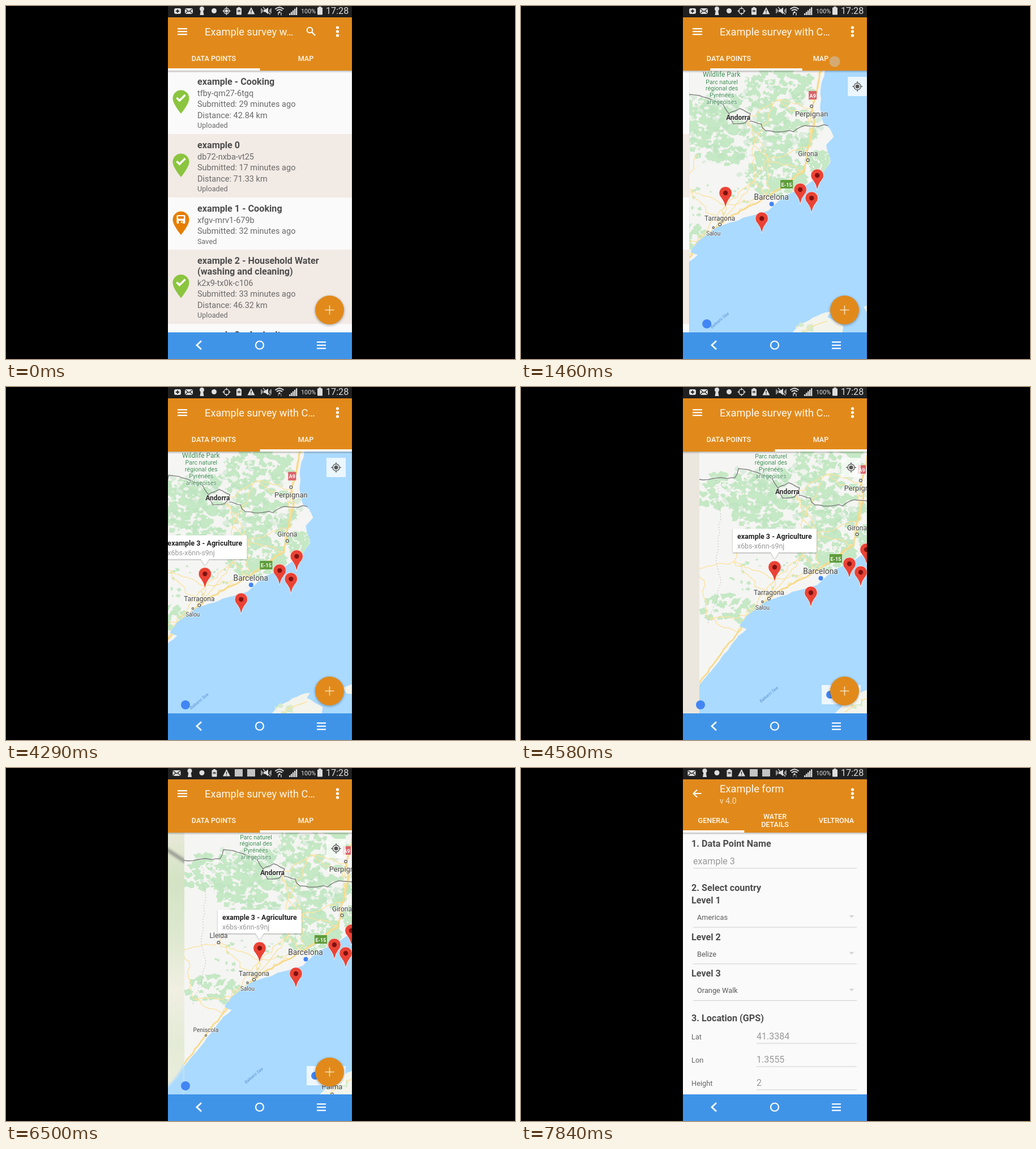
An HTML page for the animation above (8 s loop, 899 px wide and 623 px high).

```html
<!DOCTYPE html>
<html lang="en">
<head>
<meta charset="utf-8">
<title>Survey app</title>
<style>
html, body { margin: 0; width: 100%; height: 100%; overflow: hidden; background: #000; }
svg { display: block; width: 100vw; height: 100vh; font-family: Roboto, sans-serif; }
.halo { paint-order: stroke; stroke: #fff; stroke-width: 1.6px; stroke-opacity: .7; text-anchor: middle; }
</style>
</head>
<body>
<svg id="stage" viewBox="0 0 899 623"></svg>
<script>
const ORANGE = '#e18a1b', INK = '#dedede', GREY = '#6a6a6a', DARK = '#4d4d4d', CREAM = '#fff8ee';
const LOOP = 8000, BEAT = 147, LEFT = 286, WIDTH = 325;

// ---- drawing helpers ----
const text = (x, y, s, size, fill, more = '') =>
  `<text x="${x}" y="${y}" font-size="${size}" fill="${fill}" ${more}>${s}</text>`;
const mid = 'text-anchor="middle"', bold = 'font-weight="700"', medium = 'font-weight="500"';
const rect = (x, y, w, h, fill, more = '') =>
  `<rect x="${x}" y="${y}" width="${w}" height="${h}" fill="${fill}" ${more}/>`;
const dot = (x, y, r, fill, more = '') => `<circle cx="${x}" cy="${y}" r="${r}" fill="${fill}" ${more}/>`;
const ring = (x, y, r, color, width) => dot(x, y, r, 'none', `stroke="${color}" stroke-width="${width}"`);
const line = (d, stroke, width, more = '') =>
  `<path d="${d}" fill="none" stroke="${stroke}" stroke-width="${width}" ${more}/>`;
const shape = (d, fill, more = '') => `<path d="${d}" fill="${fill}" ${more}/>`;
const group = (id, body, more = '') => `<g id="${id}" ${more}>${body}</g>`;
const points = s => s.split(' ').map(p => p.split(',').map(Number));

function random(seed) {
  return () => (seed = (seed * 16807) % 2147483647) / 2147483647;
}

// a wavering line through a few key points
function rough(keys, amp, seed) {
  const rnd = random(seed), out = [];
  keys.forEach(([x, y], i) => {
    out.push([x, y]);
    if (i === keys.length - 1) return;
    const [x2, y2] = keys[i + 1], n = Math.round(Math.hypot(x2 - x, y2 - y) / 8);
    for (let k = 1; k < n; k++) {
      out.push([x + (x2 - x) * k / n + (rnd() - 0.5) * amp, y + (y2 - y) * k / n + (rnd() - 0.5) * amp]);
    }
  });
  return 'M' + out.map(p => p.map(v => v.toFixed(1))).join('L');
}

// irregular patches scattered around a centre
function patches(seed, count, cx, cy, rx, ry, size) {
  const rnd = random(seed);
  let d = '';
  for (let i = 0; i < count; i++) {
    const turn = rnd() * 2 * Math.PI, far = Math.sqrt(rnd()), r = size * (0.3 + rnd());
    const x = cx + rx * far * Math.cos(turn), y = cy + ry * far * Math.sin(turn);
    for (let k = 0; k < 9; k++) {
      const a = k * Math.PI / 4.5, q = r * (0.4 + rnd() * 0.8);
      d += (k ? 'L' : 'M') + (x + q * 1.2 * Math.cos(a)).toFixed(1) + ',' + (y + q * Math.sin(a)).toFixed(1);
    }
    d += 'z';
  }
  return d;
}

// ---- status bar ----
function statusBar() {
  const plus = rect(297, 4, 12, 10, INK, 'rx="3"') + line('M303 6v6M300 9h6', '#222', 1.8);
  const mail = rect(316, 4, 14, 10, INK) + line('M316 4.5l7 5.5l7-5.5M316 14l5-5M330 14l-5-5', '#222', 1.1);
  const key = dot(346, 5, 4, INK) + shape('M344 7h4l1.5 9h-7z', INK);
  const usb = dot(367.5, 8.5, 4.5, INK);
  const gps = line('M389.5 1.5v4M389.5 12v4M382.5 8.8h4M392.5 8.8h4', INK, 1.4) +
    ring(389.5, 8.8, 4.8, INK, 1.4) + dot(389.5, 8.8, 2.7, INK, 'id="fix"');
  const clip = rect(407, 3.5, 9, 12, INK, 'rx="1"') + rect(409.5, 2, 4, 2, INK) + rect(409, 7, 5, 3.5, '#666');
  const warn = shape('M433 2l6.5 12.5h-13z', INK) + line('M433 6.5v4M433 11.7v1.4', '#222', 1.4);
  const mute = shape('M455 6.5h3l5-4v12l-5-4h-3z', INK) +
    line('M451 4v9M453 6v5M468 4v9M466 6v5M454 2l13 13', INK, 1.2);
  const wifi = line('M475.5 5.5q7.5-6.5 15 0M478 8.3q5-4 10 0', INK, 1.9) + dot(483, 11, 1.7, INK) +
    line('M481 16v-5M486 11.5v5', INK, 1.5, 'id="traffic"');
  let bars = '';
  for (let i = 0; i < 5; i++) bars += rect(500 + i * 3, 13 - i * 2.7, 2.3, 3 + i * 2.7, INK);
  return rect(LEFT, 0, WIDTH, 20, '#202020') +
    group('plus', plus) + group('left', mail + key + usb) + group('gps', gps) + group('right', clip + warn) +
    group('apps', rect(404, 2, 14, 13, '#c4c4c4') + rect(426, 2, 14, 13, '#c4c4c4')) +
    mute + wifi + bars + text(521, 13, '100%', 10.8, INK) +
    rect(550, 2.5, 9, 13, INK, 'rx="1"') + rect(552.5, 1, 4, 2, INK) + text(565, 14.3, '17:28', 16.2, INK);
}

// ---- data point list ----
const ROWS = [
  { title: ['example - Cooking'], code: 'tfby-qm27-6tgq', mins: 29, km: '42.84' },
  { title: ['example 0'], code: 'db72-nxba-vt25', mins: 17, km: '71.33' },
  { title: ['example 1 - Cooking'], code: 'xfgv-mrv1-679b', mins: 32 },
  { title: ['example 2 - Household Water', '(washing and cleaning)'], code: 'k2x9-tx0k-c106', mins: 33, km: '46.32' },
  { title: ['example 3 - Agriculture'], code: 'x6bs-x6nn-s9nj', mins: 35, km: '38.10' }
];

function listPin(y, saved) {
  const mark = saved
    ? rect(301.5, y - 8, 15, 15, '#fff', 'rx="1.5"') + rect(304, y - 6, 10, 4.5, '#e67e00') +
      rect(305, y + 2, 7, 5, '#e67e00') + rect(309, y + 3, 2, 3, '#fff')
    : line(`M301.5 ${y - 1}l5 5l10-10`, '#fff', 3.6);
  return shape(`M309 ${y + 27}q-14.5-18-14.5-27a14.5 14.5 0 0 1 29 0q0 9-14.5 27z`, saved ? '#e67e00' : '#8bc53f') + mark;
}

function list() {
  let top = 114, out = '';
  ROWS.forEach(({ title, code, mins, km }, i) => {
    const extra = (title.length - 1) * 19, height = (km ? 112 : 92) + extra;
    const lines = [code, `Submitted: ${mins} minutes ago`];
    if (km) lines.push(`Distance: ${km} km`);
    const base = top + 25 + extra;
    out += rect(LEFT, top, WIDTH, height, i % 2 ? '#f2eae5' : '#fafafa') +
      title.map((s, k) => text(338, top + 25 + k * 19, s, 16.2, DARK, bold)).join('') +
      lines.map((s, k) => text(338, base + 19.5 * (k + 1), s, 14.5, GREY)).join('') +
      text(338, base + 19.2 * lines.length + 18.3, km ? 'Uploaded' : 'Saved', 12.7, GREY) +
      listPin(top + height / 2 - 7, !km);
    top += height;
  });
  return out;
}

// ---- map ----
const COAST = rough(points('217,100 530,100 519,140 517,180 523,207 534,216 541,231 528,245 536,275 518,300 ' +
  '488,319 456,334 426,361 388,372 335,390 300,416 288,434 301,439 286,451 247,502 217,538'), 2, 7);
const HIGHWAY = points('217,535 285,445 350,376 425,336 490,290 496,250 507,205 503,180 520,112');
const HUBS = points('278,320 340,384 400,308 350,352 425,270 400,245 300,416 217,332 235,420 300,262 440,166 390,200')
  .concat(HIGHWAY);

function roads() {
  let d = '';
  HUBS.forEach((a, i) => HUBS.slice(0, i).forEach((b, k) => {
    if (Math.hypot(a[0] - b[0], a[1] - b[1]) < 90) d += rough([a, b], 7, 100 + i * 31 + k);
  }));
  return line(d, '#fbe3a0', 1.4) + line(rough(HIGHWAY, 3, 3), '#f9d988', 2.6);
}

function terrain() {
  const green = '#c5e8c5', pale = '#f3f5f0';
  return shape(patches(11, 230, 390, 220, 125, 62, 8), green) +
    shape(patches(23, 90, 445, 140, 62, 34, 7), green) +
    shape(patches(31, 70, 275, 195, 75, 32, 7), green) +
    shape(patches(47, 110, 437, 297, 52, 38, 7), green) +
    shape(patches(53, 36, 514, 278, 20, 24, 6), green) +
    shape(patches(61, 34, 268, 402, 46, 26, 7), green) +
    shape(patches(79, 30, 340, 345, 70, 35, 3), green) +
    shape(patches(67, 110, 390, 215, 140, 90, 7), '#b4dfb9', 'opacity=".4"') +
    shape(patches(71, 240, 390, 215, 150, 100, 3.4), pale, 'opacity=".9"') + roads() +
    line(rough(points('247,177 255,240 247,312 254,360 232,430'), 5, 9), '#bbb', 1, 'stroke-dasharray="2 3"');
}

const marker = ([x, y]) =>
  shape(`M${x} ${y + 26}q-2-11-8-18a11.3 11.3 0 1 1 16 0q-6 7-8 18z`, '#ea4335', 'stroke="#fff" stroke-opacity=".7"') +
  dot(x, y, 4.2, '#7f1210');

function labels() {
  const place = (x, y, s, size, gap, r = 2.4) =>
    text(x, y, s, size, '#444', 'class="halo"') + dot(x, y + gap, r, '#fff', 'stroke="#555" stroke-width="1.2"');
  const shield = (x, y, w, s, fill) => rect(x - w / 2, y, w, 15, fill) + text(x, y + 11.5, s, 9, '#fff', `${mid} ${bold}`);
  const park = ['Parc naturel', 'régional des', 'Pyrénées', 'ariégeoises'];
  return text(343, 125, 'Wildlife Park', 12, '#3c8a50', 'class="halo"') +
    park.map((s, i) => text(343.5, 137.5 + i * 11.8, s, 10.6, '#3c8a50', 'class="halo"')).join('') +
    text(372.5, 200.5, 'Andorra', 12, '#2d2d2d', `${bold} class="halo"`) +
    text(431, 342, 'Barcelona', 13.8, '#444', 'class="halo"') + dot(431.5, 349.5, 4, '#4285f4') +
    place(502, 195, 'Perpignan', 13, -18) + place(495.5, 264.5, 'Girona', 12, 7.5) +
    place(340, 378.5, 'Tarragona', 12, 7) + place(328.5, 405, 'Salou', 10, -14, 1.6) +
    shield(504, 150, 14, 'A9', '#d9636b') + shield(458, 307, 22, 'E-15', '#5f9c3b') +
    text(340, 557, 'Balearic Sea', 7.5, '#5b8fd0', `${mid} font-style="italic" transform="rotate(-40 340 555)"`) +
    group('towns', place(277.5, 312, 'Lleida', 12, 8) + place(255, 478, 'Peniscola', 10.3, 6, 1.5) +
      place(478, 579, 'Palma', 13, 9));
}

function mapPage() {
  const strip = rect(180, 114, 37, 480, 'url(#haze)') +
    line('M180 152L220 178', '#7d7d78', 6, 'filter="url(#blur)" opacity=".75"') +
    shape('M217 534Q204 562 180 580V600H217z', '#aadaff', 'filter="url(#blur)"');
  const island = rough(points('455,590 482,562 520,543 536,540 530,549 558,565 556,590'), 2, 5) + 'z';
  const borders = rough(points('217,175 280,172 286,156 320,163 345,172 356,190'), 3, 15) +
    rough(points('356,190 375,181 394,190 385,206 364,208 356,190'), 3, 19) +
    rough(points('393,203 413,208 421,220 470,222 490,211 531,211'), 4, 17);
  const popup = shape('M276 262h148v42h-67l-7 11l-7-11h-67z', '#fff', 'filter="url(#shade)"') +
    text(284, 280, ROWS[4].title[0], 12.5, '#222', bold) + text(284, 297, ROWS[4].code, 12.4, '#999');
  const tiles = rect(150, 100, 67, 500, '#ebe7de') + group('strip', strip) + rect(217, 100, 420, 500, '#aadaff') +
    shape(COAST + 'z', '#f5f5f3') + group('land', terrain(), 'clip-path="url(#coast)"') +
    shape(island, '#f3f4ec') + shape(patches(83, 9, 488, 566, 14, 12, 5), '#d5ebcb') +
    line('M474 586L500 566L530 556', '#fbe3a0', 1.6) + shape('M594 531l17-7l19 6v15l-30-4z', '#f3f4ec') +
    line(borders, '#808080', 1.4) + labels() +
    points('512,299 482,324 502,339 350,330 414,375').map(marker).join('') + group('popup', popup);
  const locate = rect(566, 125, 34, 34, '#fff', 'opacity=".76"') +
    line('M583 133v4M583 147v4M574 142h4M588 142h4', '#666', 1.5) + ring(583, 142, 6, '#666', 1.5) + dot(583, 142, 3.5, '#555');
  const route = rect(531, 526, 69, 34, '#fff', 'opacity=".8"') + dot(546, 543, 7, '#4285f4');
  return `<g clip-path="url(#page)">${rect(LEFT, 114, WIDTH, 462, '#ebe7de') + group('tiles', tiles) + locate +
    dot(317, 561, 8, '#4285f4') + group('route', route)}</g>`;
}

// ---- bars ----
const dots = [38, 45, 52].map(y => dot(585.5, y, 2.6, '#fff')).join('');
const stripes = (x, w, y, gap) => [0, 1, 2].map(i => rect(x, y + i * gap, w, 2.2, '#fff')).join('');
const tab = (x, y, s) => text(x, y, s, 12.6, CREAM, `${mid} ${medium}`);
const shadow = rect(LEFT, 114, WIDTH, 4, 'url(#drop)');

function header() {
  return rect(LEFT, 20, WIDTH, 94, ORANGE) + stripes(303, 17, 39, 5) + dots + text(351, 52, '', 18.3, CREAM, 'id="title"') +
    group('search', ring(536.5, 42.5, 4.8, '#fff', 2) + line('M540 46l6 6', '#fff', 2.4)) +
    tab(367, 97, 'DATA POINTS') + tab(529.5, 97, 'MAP') + shadow + rect(LEFT, 110, WIDTH / 2, 4, '#fff', 'id="bar"');
}

function fab() {
  return dot(571.5, 538, 26, '#000', 'opacity=".28" filter="url(#blur)"') + dot(571.5, 536.5, 25.5, ORANGE) +
    line('M571.5 528.5v16M563.5 536.5h16', '#f8dfbd', 1.6);
}

function navBar() {
  return rect(LEFT, 576, WIDTH, 47, '#4094e8') + line('M345 591l-8 7.5l8 7.5', '#fff', 2.8) +
    ring(448, 598.5, 7, '#fff', 2.2) + stripes(549, 16, 592, 5.6);
}

// ---- form ----
function form() {
  const head = (y, s) => text(301, y, s, 16.2, DARK, bold);
  const rule = (x, y) => rect(x, y, 593 - x, 1, '#cfcfcf');
  const choice = (s, i) => {
    const y = 239 + i * 64.7;
    return head(y, `Level ${i + 1}`) + text(311, y + 29, s, 12.8, '#5c5c5c') +
      shape(`M579.5 ${y + 21}h9l-4.5 4.5z`, '#d4d4d4') + rule(304, y + 41.5);
  };
  const field = ([name, value], i) => {
    const y = 478.5 + i * 41;
    return text(301, y, name, 12.8, '#666') + text(416, y, value, 16, '#999') + rule(416, y + 7);
  };
  return rect(LEFT, 20, WIDTH, 600, '#fafafa') + rect(LEFT, 20, WIDTH, 94, ORANGE) +
    line('M318.5 45h-13M311 38.5l-6.5 6.5l6.5 6.5', '#fff', 2) + dots +
    text(351, 43, 'Example form', 18.3, CREAM) + text(351, 63, 'v 4.0', 14, '#f8e0c2') +
    tab(340, 97, 'GENERAL') + tab(448.5, 89.5, 'WATER') + tab(448.5, 104, 'DETAILS') + tab(557, 97, 'VELTRONA') +
    shadow + rect(LEFT, 110, WIDTH / 3, 4, '#fff') +
    head(139, '1. Data Point Name') + text(304, 170, 'example 3', 16.1, '#999') + rule(304, 176.5) +
    head(216.5, '2. Select country') + ['Americas', 'Belize', 'Orange Walk'].map(choice).join('') +
    head(447, '3. Location (GPS)') + [['Lat', '41.3384'], ['Lon', '1.3555'], ['Height', '2']].map(field).join('') +
    rect(604.5, 117, 4, 319, '#a9a9a9', 'id="scroll"');
}

const haze = ['#eceadb', '#d3e3c4', '#dde8cf', '#f0efe2', '#e3ebd6', '#eeeede']
  .map((c, i) => `<stop offset="${i / 5}" stop-color="${c}"/>`).join('');
const stage = document.getElementById('stage');
stage.innerHTML = `<defs>
  <clipPath id="page">${rect(LEFT, 114, WIDTH, 462)}</clipPath>
  <clipPath id="screen">${rect(LEFT, 20, WIDTH, 556)}</clipPath>
  <clipPath id="coast"><path d="${COAST}z"/></clipPath>
  <filter id="blur"><feGaussianBlur stdDeviation="2"/></filter>
  <filter id="shade" x="-10%" y="-10%" width="120%" height="130%"><feDropShadow dx="0" dy="1" stdDeviation="1" flood-opacity=".35"/></filter>
  <linearGradient id="drop" x2="0" y2="1"><stop stop-opacity=".25"/><stop offset="1" stop-opacity="0"/></linearGradient>
  <linearGradient id="haze" x2="0" y2="1">${haze}</linearGradient>
  </defs>` +
  rect(0, 0, 899, 623, '#000') +
  `<g clip-path="url(#page)">${group('list', list()) + group('map', mapPage()) + fab()}</g>` +
  header() + dot(0, 0, 9.5, '#c9c9c9', 'id="touch" opacity=".5"') +
  `<g clip-path="url(#screen)">${group('form', form())}</g>` + statusBar() + navBar();

// ---- animation ----
const el = {};
stage.querySelectorAll('[id]').forEach(n => el[n.id] = n);
const show = (id, on) => el[id].style.display = on ? '' : 'none';
const move = (id, x, y = 0) => el[id].setAttribute('transform', `translate(${x.toFixed(2)} ${y.toFixed(2)})`);
const fade = (id, v) => el[id].setAttribute('opacity', v);
const clamp = v => Math.max(0, Math.min(1, v));
// progress of a motion, held for one beat at a time; the slack absorbs uneven beats
const progress = (t, start, length) => clamp(Math.floor((t - start + 10) / BEAT) * BEAT / length);

const TOUCHES = [
  { from: 1320, to: 1760, x: 554, y: 98 },
  { from: 3840, to: 4140, x: 352, y: 338 },
  { from: 5920, to: 6210, x: 450, y: 277 }
];

function render(t) {
  const swipe = progress(t, 1320, 300);
  const away = WIDTH * Math.pow(1 - swipe, 5);
  move('list', away - WIDTH);
  move('map', away);
  move('bar', WIDTH / 2 * Math.pow(swipe, 1.7));
  const onMap = t >= 1460;
  el.title.textContent = onMap ? 'Example survey with C…' : 'Example survey w…';
  show('search', !onMap);

  const selected = t >= 4290;
  const u = selected ? clamp(0.07 + progress(t, 4290, 300)) : 0;
  const pan = u * u * (3 - 2 * u);
  move('tiles', 98 * pan, -12 * pan);
  show('popup', selected);
  show('route', t >= 4430);
  show('strip', t >= 4730);
  show('towns', t >= 5030);

  const touch = TOUCHES.find(p => t >= p.from && t < p.to);
  show('touch', touch);
  if (touch) move('touch', touch.x, touch.y);

  const notified = t >= 5770;
  show('plus', !notified);
  show('gps', !notified);
  show('apps', notified);
  move('left', notified ? -21.5 : 0);
  move('right', notified ? -43.5 : 0);
  show('fix', Math.floor((t + 119) / 489) % 2 === 0);
  fade('traffic', Math.floor((t - 500) / 1000) % 2 === 1 ? 0.4 : 0.9);

  const open = 1 - Math.pow(1 - progress(t, 6653, 440), 2);
  show('form', open > 0);
  fade('form', open);
  move('form', 0, 40 * (1 - open));
  fade('scroll', t < 7690 ? 0.7 : t < 7840 ? 0.3 : 0);
}

function loop() {
  render(performance.now() % LOOP);
  requestAnimationFrame(loop);
}
loop();
</script>
</body>
</html>
```
